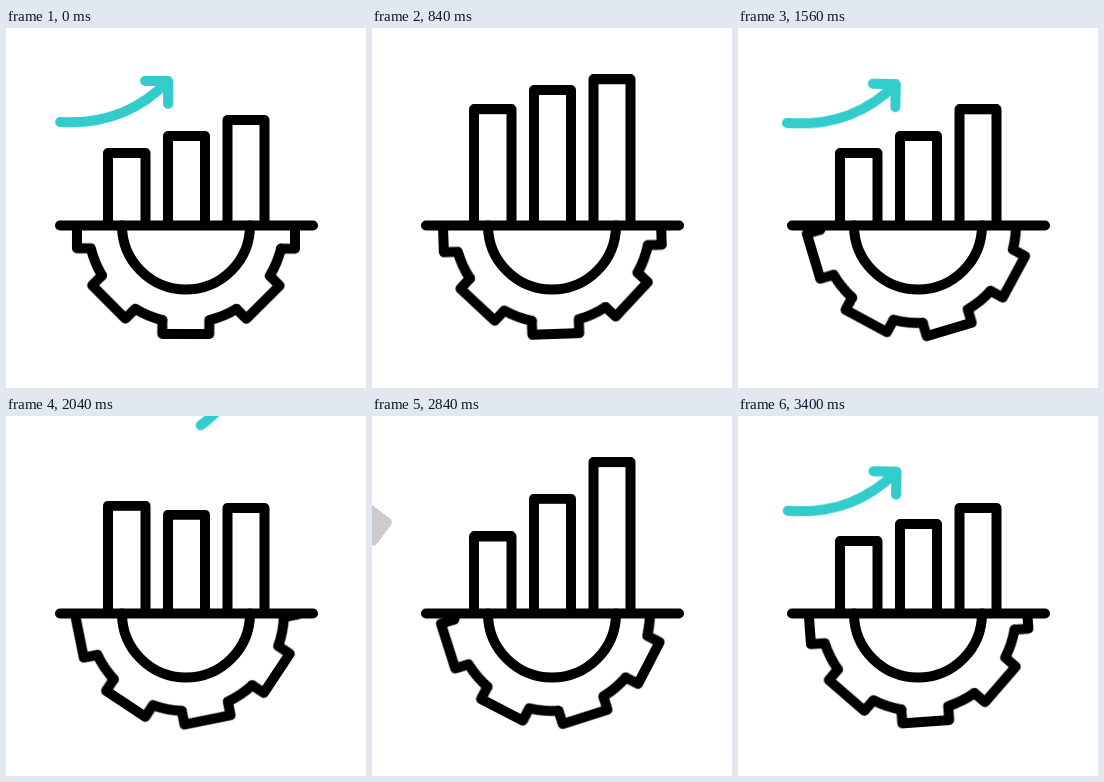
Animation of 360 by 360 pixels, one loop 3440 ms. Source, as an HTML page:

```html
<!DOCTYPE html>
<html lang="en">
<head>
<meta charset="utf-8">
<title>Growth gear</title>
<style>
  html, body { margin: 0; width: 100%; height: 100%; overflow: hidden; background: #fff; }
  svg { display: block; width: 360px; height: 360px; }

  .ink {
    fill: none;
    stroke: #000;
    stroke-width: 10;
    stroke-linecap: round;
    stroke-linejoin: round;
  }

  .gear { animation: spin 3440ms linear infinite; }
  .bar { animation: rise 3440ms linear infinite; }
  .bar.b { animation-delay: 200ms; }
  .bar.c { animation-delay: 400ms; }

  .arrow {
    color: #33cccc;
    stroke: currentColor;
    transform-origin: 8.4px -141px;
    animation: swing 3440ms linear infinite, tint 3440ms step-end infinite;
  }
  .shaft { fill: none; }

  @keyframes spin { to { transform: rotate(360deg); } }

  /* two rises per loop: quick start, soft stop, even fall */
  @keyframes rise {
    0% { transform: translateY(0); }
    3.343% { transform: translateY(0); animation-timing-function: cubic-bezier(.333, .52, .64, 1); }
    17.006% { transform: translateY(-46px); }
    23.837% { transform: translateY(-46px); }
    36.773% { transform: translateY(0); }
    51.744% { transform: translateY(0); animation-timing-function: cubic-bezier(.333, .52, .64, 1); }
    65.407% { transform: translateY(-46px); }
    70.93% { transform: translateY(-46px); }
    83.866% { transform: translateY(0); }
    100% { transform: translateY(0); }
  }

  /* leaves at the top, comes back from the left, twice per loop */
  @keyframes swing {
    0% { transform: rotate(0deg); animation-timing-function: cubic-bezier(.333, .1, .667, .55); }
    23.256% { transform: rotate(-75.2deg); animation-timing-function: step-end; }
    23.257% { transform: rotate(71.4deg); animation-timing-function: cubic-bezier(.333, .45, .667, .9); }
    46.512% { transform: rotate(0deg); animation-timing-function: cubic-bezier(.333, .15, .667, .55); }
    69.767% { transform: rotate(-90.7deg); animation-timing-function: step-end; }
    69.768% { transform: rotate(81.2deg); animation-timing-function: cubic-bezier(.333, .45, .667, .9); }
    100% { transform: rotate(0deg); }
  }

  @keyframes tint {
    0% { color: #33cccc; fill: transparent; }
    80.81% { color: #cbcbcb; fill: #cbcbcb; }
    83.14% { color: #33cccc; fill: transparent; }
    100% { color: #33cccc; fill: transparent; }
  }
</style>
</head>
<body>
<svg viewBox="0 0 360 360">
  <defs>
    <clipPath id="above"><rect width="360" height="197"/></clipPath>
    <clipPath id="below"><rect y="197" width="360" height="163"/></clipPath>
    <path id="tooth" d="M-23.5 95.1V109H23.5V95.1A98 98 0 0 0 50.6 83.9"/>
  </defs>

  <g class="ink">
    <g clip-path="url(#below)">
      <g transform="translate(180 197)">
        <g class="gear">
          <use href="#tooth"/>
          <use href="#tooth" transform="rotate(45)"/>
          <use href="#tooth" transform="rotate(90)"/>
          <use href="#tooth" transform="rotate(135)"/>
          <use href="#tooth" transform="rotate(180)"/>
          <use href="#tooth" transform="rotate(225)"/>
          <use href="#tooth" transform="rotate(270)"/>
          <use href="#tooth" transform="rotate(315)"/>
        </g>
      </g>
    </g>
    <path d="M116 197.5A64 64 0 0 0 244 197.5"/>

    <g clip-path="url(#above)">
      <path class="bar" d="M102 260V125H139.5V260"/>
      <path class="bar b" d="M162 260V108H199V260"/>
      <path class="bar c" d="M221.5 260V92H258.5V260"/>
    </g>
    <path d="M54 197.5H307"/>

    <g class="arrow">
      <path class="shaft" d="M54 94Q118 98 161 54"/>
      <path d="M139 53H162V76"/>
    </g>
  </g>
</svg>
</body>
</html>
```
